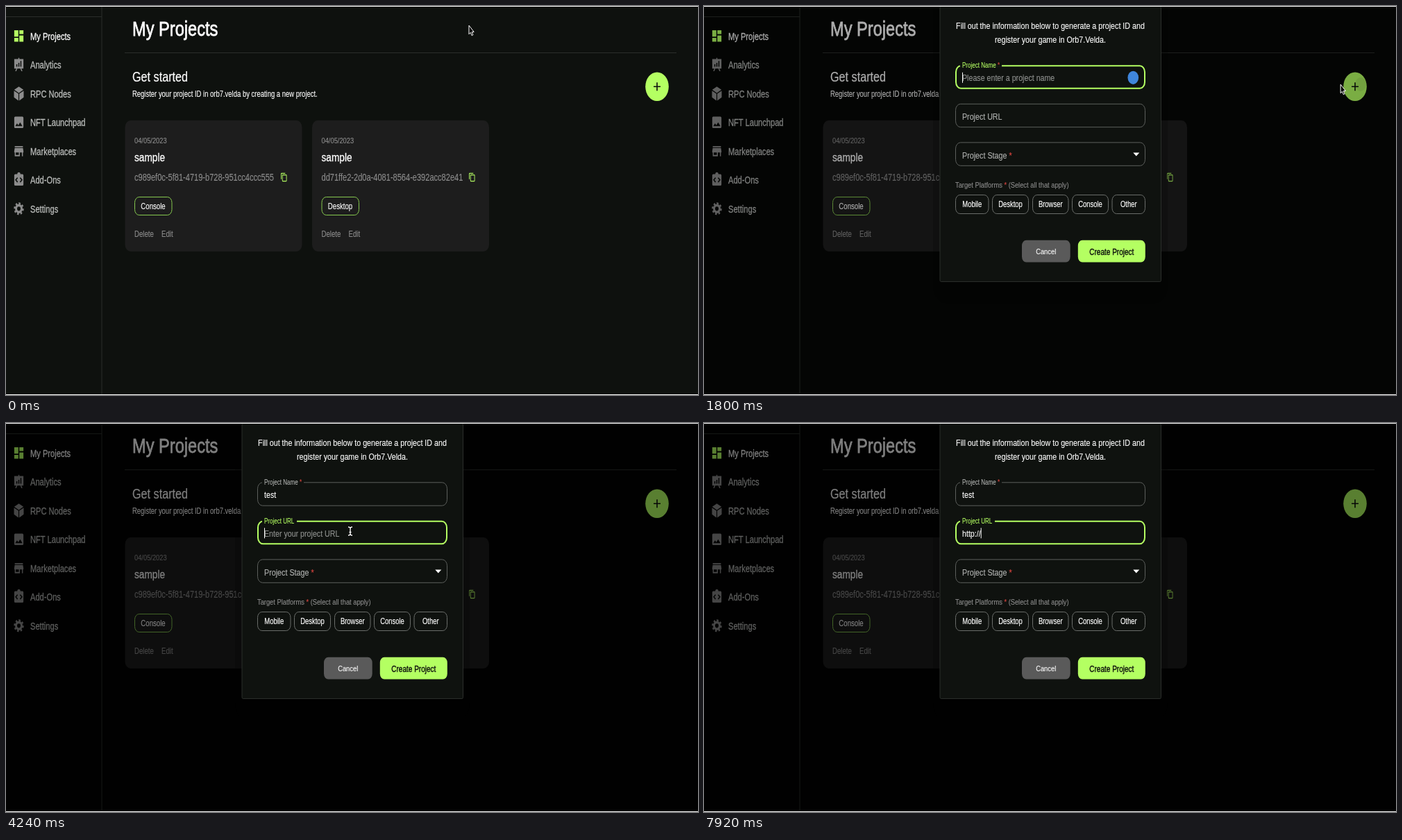
An HTML page for the animation above (8 s loop, 997 by 561 pixels).

```html
<!DOCTYPE html>
<html lang="en">
<head>
<meta charset="utf-8">
<title>My Projects</title>
<style>
  html, body { margin: 0; width: 100%; height: 100%; overflow: hidden; background: #000; }
  svg { display: block; width: 100vw; height: 100vh; }
  text { font-family: "Liberation Sans", Arial, sans-serif; white-space: pre; }
</style>
</head>
<body>
<svg id="stage" viewBox="0 0 997 561" preserveAspectRatio="none"></svg>
<script>
const LOOP = 8000;
const SQUEEZE = 0.79; // the whole screen is narrowed by this much
const GREEN = '#b4ff62', WHITE = '#fff', RED = '#d8453f', PANEL = '#0f120f', GREY = '#8c8c8c';
const LABEL = '#b0b2b0', EDGE = '#5c5f5c';

const stage = document.getElementById('stage');

function add(parent, tag, attrs = {}) {
  const el = document.createElementNS('http://www.w3.org/2000/svg', tag);
  set(el, attrs);
  parent.append(el);
  return el;
}
function set(el, attrs) {
  for (const key in attrs) el.setAttribute(key, attrs[key]);
}
const group = (parent, attrs) => add(parent, 'g', attrs);
const path = (parent, d, attrs) => add(parent, 'path', { d, ...attrs });

function box(parent, x1, y1, x2, y2, r, attrs) {
  return add(parent, 'rect', { x: x1, y: y1, width: x2 - x1, height: y2 - y1, rx: r * SQUEEZE, ry: r, ...attrs });
}
const outline = (parent, x1, y1, x2, y2, r, stroke) =>
  box(parent, x1, y1, x2, y2, r, { fill: 'none', stroke });

// cy is the middle of the capital letters
function text(parent, x, cy, size, content, { fill = WHITE, weight = 0.15, anchor = 'start' } = {}) {
  const el = add(parent, 'text', {
    transform: `translate(${x} ${cy}) scale(${SQUEEZE} 1)`,
    y: size * 0.35, 'font-size': size, fill, stroke: fill, 'stroke-width': weight, 'text-anchor': anchor
  });
  el.textContent = content;
  return el;
}
const centered = (parent, x, cy, size, content, style) =>
  text(parent, x, cy, size, content, { anchor: 'middle', ...style });
function star(label) {
  const el = add(label, 'tspan', { fill: RED, stroke: RED });
  el.textContent = ' *';
}

/* page */

add(stage, 'rect', { width: 997, height: 561 });
const backdrop = add(stage, 'rect', { width: 997, height: 561, fill: '#0e110e' });
const page = group(stage);

const icons = {
  dashboard: 'M3 13h8V3H3zM3 21h8v-6H3zM13 21h8V11h-8zM13 3v6h8V3z',
  board: 'M11 1h2v2h8v15h-4l2 4h-2l-2-4H9l-2 4H5l2-4H3V3h8zM7 11v4h2v-4zM11 9v6h2V9zM15 6v9h2V6z',
  cube: 'M12 1l9 5-9 5-9-5zM2.5 7.5l8.7 4.8V23l-8.7-5zM21.5 7.5l-8.7 4.8V23l8.7-5z',
  image: 'M21 19V5c0-1.1-.9-2-2-2H5c-1.1 0-2 .9-2 2v14c0 1.1.9 2 2 2h14c1.1 0 2-.9 2-2zM8.5 13.5l2.5 3 3.5-4.5 4.5 6H5z',
  store: 'M20 4H4v2h16zM21 14v-2l-1-5H4l-1 5v2h1v6h10v-6h4v6h2v-6zM12 18H6v-4h6z',
  clipboard: 'M19 3h-4a3 3 0 0 0-6 0H5a2 2 0 0 0-2 2v14a2 2 0 0 0 2 2h14a2 2 0 0 0 2-2V5a2 2 0 0 0-2-2z',
  copy: 'M16 1H4a2 2 0 0 0-2 2v14h2V3h12zM19 5H8a2 2 0 0 0-2 2v14a2 2 0 0 0 2 2h11a2 2 0 0 0 2-2V7a2 2 0 0 0-2-2zm0 16H8V7h11z'
};
function icon(parent, x, y, scale, name, fill) {
  const g = group(parent, { transform: `translate(${x} ${y}) scale(${scale * 0.8} ${scale}) translate(-12 -12)` });
  if (icons[name]) path(g, icons[name], { fill, 'fill-rule': 'evenodd' });
  return g;
}

path(page, 'M0 15.5H138M138 1V560M171 67.5H966', { stroke: '#2b2e2b', fill: 'none' });

const menu = [
  ['My Projects', 'dashboard'], ['Analytics', 'board'], ['RPC Nodes', 'cube'], ['NFT Launchpad', 'image'],
  ['Marketplaces', 'store'], ['Add-Ons', 'clipboard'], ['Settings', 'gear']
];
menu.forEach(([label, name], i) => {
  const y = 44 + i * 41.5;
  const active = i === 0;
  const g = icon(page, 18.5, y - 0.7, 0.92, name, active ? GREEN : GREY);
  if (name === 'clipboard') {
    path(g, 'M9.5 8.5L6 12l3.5 3.5M14.5 8.5L18 12l-3.5 3.5', { fill: 'none', stroke: '#0e110e', 'stroke-width': 2 });
  }
  if (name === 'gear') {
    const ring = { cx: 12, cy: 12, fill: 'none', stroke: GREY };
    add(g, 'circle', { ...ring, r: 5.4, 'stroke-width': 4 });
    add(g, 'circle', { ...ring, r: 8, 'stroke-width': 3.6, pathLength: 16, 'stroke-dasharray': '1 1' });
  }
  text(page, 35, y, 14.1, label, { fill: active ? WHITE : '#bcbebc', weight: 0.3 });
});

text(page, 182, 33, 29.9, 'My Projects', { weight: 0.8 });
text(page, 182, 102, 20.5, 'Get started', { weight: 0.25 });
text(page, 182, 127, 12, 'Register your project ID in orb7.velda by creating a new project.');

function card(x, id, platform, copyX) {
  const g = group(page, { transform: `translate(${x} 0)` });
  box(g, 0, 165, 255, 354, 10, { fill: '#1d1d1d' });
  text(g, 13.5, 194, 11.8, '04/05/2023', { fill: GREY });
  text(g, 13.5, 218, 17.3, 'sample', { weight: 0.35 });
  text(g, 13.5, 247.5, 14, id, { fill: GREY });
  icon(g, copyX, 247, 0.56, 'copy', GREEN);
  outline(g, 14, 275.5, 67.5, 301.5, 8, '#86c94f');
  centered(g, 40.5, 288.5, 12.2, platform);
  text(g, 13.5, 328.5, 12.2, 'Delete', { fill: GREY });
  text(g, 52.5, 328.5, 12.2, 'Edit', { fill: GREY });
}
card(171.5, 'c989ef0c-5f81-4719-b728-951cc4ccc555', 'Console', 229);
card(441, 'dd71ffe2-2d0a-4081-8564-e392acc82e41', 'Desktop', 230.5);

const button = { cx: 938, cy: 116.3, rx: 16.8, ry: 20.8 };
add(add(stage, 'clipPath', { id: 'round' }), 'ellipse', button);
add(page, 'ellipse', { ...button, fill: GREEN });
const ripple = add(page, 'ellipse', { cx: 946, cy: 113, fill: '#4d6b35', 'clip-path': 'url(#round)' });
path(page, 'M933 116.3h10M938 110.3v12', { stroke: '#0e110e', 'stroke-width': 1.6 });

const shade = add(stage, 'rect', { width: 997, height: 561 });

/* dialog */

const dialog = group(stage);
box(dialog, 330, -30, 668, 430, 26, { fill: '#000', opacity: 0.2 });
box(dialog, 340, -10, 658.5, 397.5, 2, { fill: PANEL, stroke: '#2b2e2b' });
centered(dialog, 499, 28, 13.55, 'Fill out the information below to generate a project ID and');
centered(dialog, 499, 48.5, 13.55, 'register your game in Orb7.Velda.');

// The border is drawn inside the field's edges, whatever its weight
const FIELD = { left: 362, right: 636, height: 34.4, middle: 18.4 };
function setBorder(border, y, stroke, weight) {
  set(border, {
    x: FIELD.left + weight / 2, width: FIELD.right - FIELD.left - weight,
    y: y + weight / 2, height: FIELD.height - weight,
    stroke, 'stroke-width': weight
  });
}
function fieldBorder(y) {
  const border = outline(dialog, 0, 0, 0, 0, 9, EDGE);
  setBorder(border, y, EDGE, 1);
  return border;
}
function field(y, label, required, hint, notchWidth) {
  const cy = y + FIELD.middle;
  const border = fieldBorder(y);
  const notch = add(dialog, 'rect', { x: 369, y: y - 1, height: 3.5, fill: PANEL });
  const hintText = text(dialog, 372, cy, 13.5, hint, { fill: '#8f918f' });
  const value = text(dialog, 372, cy, 13.5, '');
  const title = text(dialog, 372, cy, 13.5, label, { fill: LABEL });
  if (required) star(title);
  const caret = add(dialog, 'rect', { y: y + 10.5, width: 1, height: 15, fill: WHITE });
  return { y, cy, border, notch, notchWidth, hintText, value, title, caret };
}
const nameField = field(85.3, 'Project Name', true, 'Please enter a project name', 60);
const urlField = field(140.8, 'Project URL', false, 'Enter your project URL', 50);

fieldBorder(196.4);
star(text(dialog, 372, 215, 13.6, 'Project Stage', { fill: LABEL }));
path(dialog, 'M618.3 211.5h9l-4.5 5z', { fill: WHITE });

const platforms = text(dialog, 362, 257.5, 11.8, 'Target Platforms', { fill: GREY });
star(platforms);
add(platforms, 'tspan').textContent = ' (Select all that apply)';
[['Mobile', 362.5, 410], ['Desktop', 415.5, 467.5], ['Browser', 473.5, 525],
 ['Console', 530.5, 582.5], ['Other', 588, 635.5]].forEach(([label, x1, x2]) => {
  outline(dialog, x1, 272.5, x2, 299.5, 8, '#6a6d6a');
  centered(dialog, (x1 + x2) / 2, 286, 12, label, { weight: 0.2 });
});

box(dialog, 458, 337.7, 527.7, 369.5, 8, { fill: '#5a5a5a' });
centered(dialog, 492.7, 354, 11.8, 'Cancel');
box(dialog, 538.8, 337.7, 635.8, 369.5, 8, { fill: GREEN });
centered(dialog, 587.3, 354.3, 12.7, 'Create Project', { fill: '#0e110e', weight: 0.4 });

const lock = add(dialog, 'ellipse', { cx: 618.3, cy: 103.3, rx: 7.8, ry: 9.6, fill: '#3f86dc' });

const tip = group(dialog);
box(tip, 509, 45, 728, 85.5, 7, { fill: '#000' });
path(tip, 'M612 85h12l-6 5z', { fill: '#000' });
centered(tip, 618, 58.3, 12.7, "Press the 4Vaultern icon in your browser's", { weight: 0.5 });
centered(tip, 618, 74.2, 12.7, 'toolbar to unlock', { weight: 0.5 });

/* pointers */

const arrow = path(stage, 'M0 0V12.6L2.4 10.2 4.1 14.6 5.9 13.6 4.2 9.4H7.2Z',
  { fill: '#000', stroke: WHITE, 'stroke-width': 1, 'stroke-linejoin': 'round' });
const beam = group(stage, { fill: 'none' });
for (const [stroke, width] of [['#000', 3], [WHITE, 1.4]]) {
  path(beam, 'M-3-6Q0-6 0-4Q0-6 3-6M0-4V4M-3 6Q0 6 0 4Q0 6 3 6M-1.5 1.5h3', { stroke, 'stroke-width': width });
}

path(stage, 'M0 .5H997M0 560.5H997', { stroke: WHITE });

/* motion */

const pointerPath = [
  [0, 667, 28], [520, 667, 28], [1200, 947, 113], [1720, 947, 113], [2220, 522, 114],
  [2360, 520, 114], [2600, 506, 108], [3320, 506, 108], [3400, 498, 151], [3560, 496, 156], [LOOP, 496, 156]
];
const nameTyping = { focus: 1600, blur: 4000, content: 'test', keys: [3120, 3200, 3260, 3340] };
const urlTyping = { focus: 4000, blur: LOOP, content: 'http://', keys: [5040, 5240, 5360, 5560, 6020, 6720, 6840] };

const ramp = (t, from, to) => Math.min(1, Math.max(0, (t - from) / (to - from)));
const smooth = u => u * u * (3 - 2 * u);
const show = (el, on) => set(el, { visibility: on ? 'visible' : 'hidden' });
const between = (t, from, to) => t >= from && t < to;

function pointerAt(t) {
  const i = pointerPath.findIndex(([time]) => time > t);
  const [t1, x1, y1] = pointerPath[i - 1], [t2, x2, y2] = pointerPath[i];
  const u = smooth(ramp(t, t1, t2));
  return [x1 + (x2 - x1) * u, y1 + (y2 - y1) * u];
}

function renderField(f, { focus, blur, content, keys }, hovered, t, open) {
  const focused = between(t, focus, blur);
  const float = 1 - (1 - ramp(t, focus, focus + 200)) ** 2;
  const scale = 1 - 0.245 * float;
  const typed = keys.filter(k => k <= t);
  const lastInput = typed.length ? typed[typed.length - 1] : focus;

  setBorder(f.border, f.y, focused ? GREEN : hovered ? WHITE : EDGE, focused ? 2 : 1);
  set(f.notch, { width: f.notchWidth * ramp(float, 0.5, 1) });
  set(f.title, {
    transform: `translate(372 ${f.cy - 17.8 * float}) scale(${SQUEEZE * scale} ${scale})`,
    fill: focused && float > 0.5 ? GREEN : LABEL,
    stroke: focused && float > 0.5 ? GREEN : LABEL
  });
  set(f.hintText, { opacity: typed.length ? 0 : ramp(t, focus, focus + 200) ** 2 });
  f.value.textContent = content.slice(0, typed.length);
  set(f.caret, { x: 372 + f.value.getComputedTextLength() * SQUEEZE });
  show(f.caret, open && focused && (t - lastInput) % 1000 < 500);
}

function render(t) {
  const dim = ramp(t, 1660, 1880);
  const open = t >= 1440;
  set(backdrop, { opacity: 1 - 0.85 * dim });
  set(shade, { opacity: 0.5 * dim });
  set(dialog, { opacity: ramp(t, 1440, 1620), visibility: open ? 'visible' : 'hidden' });

  const spread = ramp(t, 1400, 1640);
  set(ripple, { rx: 8 * spread, ry: 10 * spread, opacity: 0.4 * (1 - ramp(t, 1660, 1860)) });

  renderField(nameField, nameTyping, false, t, open);
  renderField(urlField, urlTyping, between(t, 3380, 4000), t, open);
  show(lock, between(t, 1800, 4000));
  set(tip, { opacity: ramp(t, 2060, 2140) * (1 - ramp(t, 2760, 2960)) });
  show(tip, between(t, 2060, 2960));

  const [x, y] = pointerAt(t);
  const hidden = between(t, 3120, 3340) || t >= 5040;
  const textual = t >= 2520;
  for (const [el, on] of [[arrow, !textual], [beam, textual]]) {
    set(el, { transform: `translate(${x} ${y})` });
    show(el, on && !hidden);
  }
}

const start = performance.now();
function tick() {
  render((performance.now() - start) % LOOP);
  requestAnimationFrame(tick);
}
tick();
</script>
</body>
</html>
```
